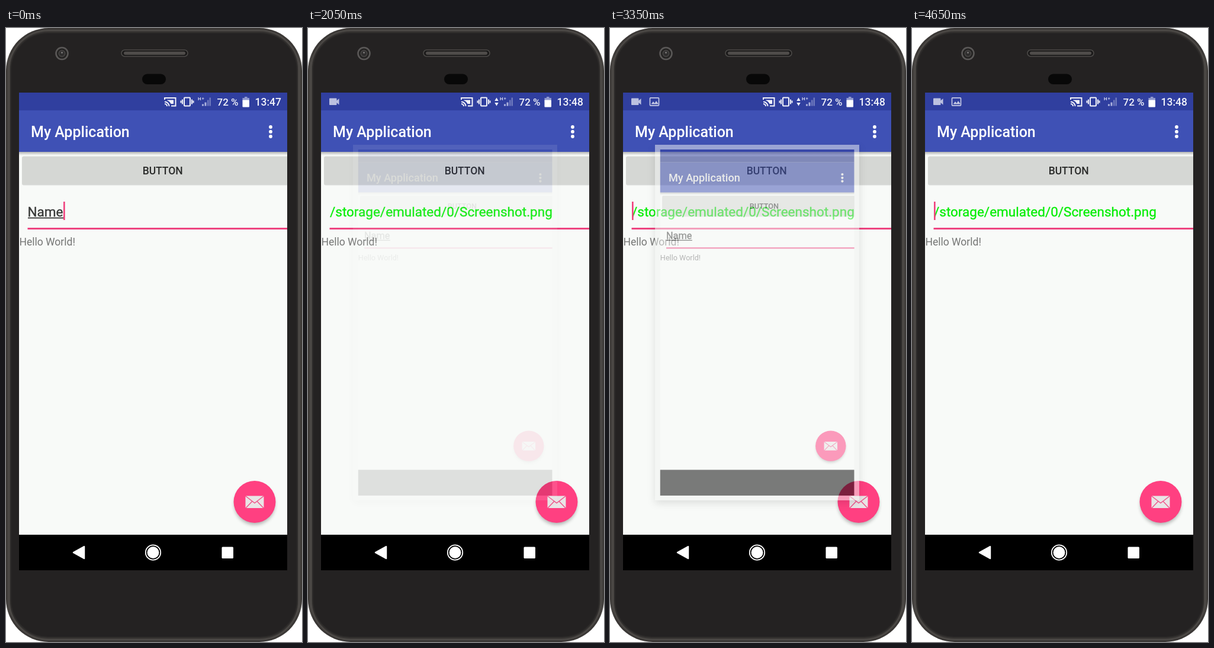
Write an HTML page that moves like this. It is 500 px wide and 1036 px high and loops after 4.7 s.

```html
<!DOCTYPE html>
<html lang="en">
<head>
<meta charset="utf-8">
<title>Screenshot preview</title>
<style>
  html, body { margin: 0; width: 100%; height: 100%; overflow: hidden; background: #fff; }
  svg { display: block; width: 100%; height: 100%; }
  text { font-family: Roboto, sans-serif; white-space: pre; }
  .title { font-size: 25px; font-weight: 500; fill: #fff; }
  .label { font-size: 17.5px; font-weight: 500; fill: #2a2b2a; }
  .hello { font-size: 17.5px; fill: #757675; }
  .field { font-size: 22.5px; fill: #363736; stroke: #363736; stroke-width: .35px; }
  #path { fill: #05ee05; stroke: #05ee05; }
  .status { font-size: 17.5px; font-weight: 500; fill: #f2f3fa; }
  #card { filter: drop-shadow(0 5px 7px rgba(0, 0, 0, .22)); }
</style>
</head>
<body>
<svg viewBox="0 0 500 1036">
  <defs>
    <linearGradient id="rim">
      <stop offset="0" stop-color="#383533"/>
      <stop offset=".008" stop-color="#4a4744"/>
      <stop offset=".018" stop-color="#3b3836"/>
      <stop offset=".982" stop-color="#3b3836"/>
      <stop offset=".992" stop-color="#4a4744"/>
      <stop offset="1" stop-color="#383533"/>
    </linearGradient>
    <linearGradient id="drop" x2="0" y2="1">
      <stop offset="0" stop-color="#000" stop-opacity=".28"/>
      <stop offset="1" stop-color="#000" stop-opacity="0"/>
    </linearGradient>
    <filter id="soft" x="-30%" y="-30%" width="160%" height="160%">
      <feGaussianBlur stdDeviation="3"/>
    </filter>
    <clipPath id="screen"><rect x="22" y="109" width="453" height="806"/></clipPath>
    <clipPath id="press"><rect x="27" y="216.5" width="460" height="48" rx="3"/></clipPath>

    <g id="base">
      <rect x="22" y="109" width="453" height="806" fill="#f8faf8"/>
      <rect x="22" y="109" width="453" height="30" fill="#303f9f"/>
      <rect x="22" y="139" width="453" height="70" fill="#3f51b5"/>
      <rect x="22" y="209" width="453" height="6" fill="url(#drop)"/>
      <rect x="27" y="217.5" width="460" height="48" rx="3" fill="#c3c4c3" opacity=".5"/>
      <rect x="27" y="216.5" width="460" height="48" rx="3" fill="#d5d7d4"/>
      <rect x="22" y="855" width="453" height="60"/>
    </g>
    <g id="labels">
      <text class="title" x="42" y="184">My Application</text>
      <g fill="#fff">
        <circle cx="447" cy="167" r="2.9"/>
        <circle cx="447" cy="175" r="2.9"/>
        <circle cx="447" cy="183" r="2.9"/>
      </g>
      <text class="label" x="264.7" y="247" text-anchor="middle">BUTTON</text>
      <text class="hello" x="22.5" y="367">Hello World!</text>
      <rect x="36.5" y="337" width="439" height="3" fill="#ee4480"/>
      <circle cx="420" cy="804" r="34" opacity=".3" filter="url(#soft)"/>
      <circle cx="420" cy="799.5" r="35.5" fill="#ff4081"/>
      <rect x="404.5" y="789.5" width="31" height="20.5" rx="1.5" fill="#e9e5e6"/>
      <path d="M405 790l15 11.5 15-11.5M405 810l10.5-11M435 810l-10.5-11" fill="none" stroke="#f0568c" stroke-width="1.5"/>
    </g>
    <g id="name">
      <text class="field" x="36.5" y="318">Name</text>
      <path d="M37 320.5h60" stroke="#444544" stroke-width="2"/>
    </g>
  </defs>

  <!-- handset -->
  <rect width="500" height="1036" rx="72" fill="url(#rim)"/>
  <rect x="5" y="4" width="490" height="1028" rx="67" fill="none" stroke="#4d4a47" stroke-width="2"/>
  <rect x="8" y="8" width="484" height="1020" rx="63" fill="#242222" stroke="#2d2b2a" stroke-width="2"/>
  <circle cx="94.5" cy="43" r="10" fill="#242322" stroke="#5a5857" stroke-width="2.6"/>
  <circle cx="94.5" cy="43" r="5.2" fill="#2f2e2e" stroke="#4a4847" stroke-width="1.5"/>
  <circle cx="94.5" cy="41.5" r="1.6" fill="#777574"/>
  <rect x="195" y="37" width="112" height="11" rx="5.5" fill="#1b1a1a" stroke="#4c4a48" stroke-width="1.5"/>
  <rect x="199" y="39.8" width="104" height="5.4" rx="2.7" fill="#4f4c4a"/>
  <rect x="230" y="77.5" width="40" height="17.5" rx="8.7" fill="#080808"/>

  <g clip-path="url(#screen)">
    <use href="#base"/>
    <rect id="lift" x="27" y="218" width="460" height="49" rx="4" opacity="0" filter="url(#soft)"/>
    <g clip-path="url(#press)">
      <rect id="pressed" x="27" y="216" width="460" height="49" fill="#cdcfcd" opacity="0"/>
      <circle id="ripple" cy="244" fill="#c3c5c3" opacity="0"/>
    </g>
    <use href="#labels"/>
    <use href="#name" id="hint"/>
    <text id="path" class="field" x="37" y="318">/storage/emulated/0/Screenshot.png</text>
    <rect id="caret" y="293" width="2.6" height="31" fill="#f0407d"/>

    <!-- status bar -->
    <path id="video" fill="#fff" d="M37 118.5h10.5q1 0 1 1v3l4-3.5v10.5l-4-3.5v3q0 1-1 1H37q-1 0-1-1v-9.5q0-1 1-1z"/>
    <g id="photo" opacity=".72">
      <rect x="67.5" y="117.8" width="15" height="13" rx="1" fill="none" stroke="#fff" stroke-width="1.7"/>
      <path d="M69.5 128.5l3.5-4.5 2.500 3 2.500-4 4 5.5z" fill="#fff"/>
    </g>
    <g id="modes" fill="none" stroke="#f2f3fa" stroke-width="2">
      <path d="M268 121v-3h18.5v13.5H279M268 124.5a7.5 7.5 0 0 1 7.5 7.5M268 128a4 4 0 0 1 4 4"/>
      <path d="M272 121.500h11v6.500h-4.500q-2-4.500-6.500-6z" fill="#f2f3fa" stroke="none"/>
      <rect x="301" y="117.5" width="10" height="14" rx="1"/>
      <path d="M298 120.5v8M295.5 122.5v4M314 120.5v8M316.5 122.5v4"/>
    </g>
    <path id="data" fill="#f2f3fa" d="M318.5 117.5l3.2 5.5h-6.4zM318.5 131.5l3.2-5.5h-6.4z"/>
    <text x="324" y="121.5" font-size="8" font-weight="700" fill="#d5d8ee">H</text>
    <path d="M331 119h3.5M332.7 117.3v3.5" stroke="#c3c8e6"/>
    <path d="M331 131.5v-3h3v3zM335.5 131.5v-6h3v6z" fill="#a9b0dc"/>
    <path d="M340 131.5v-10h2.5v10zM343.5 131.5v-14h2.5v14z" fill="#6e79bd"/>
    <text class="status" x="356.5" y="131" style="font-size:17px">72 %</text>
    <path d="M399.5 118h3.5v-2h4.5v2h3.5v5h-11.5z" fill="#8f98cf"/>
    <rect x="399.5" y="121.5" width="11.5" height="12" rx="1" fill="#fff"/>
    <text id="clock" class="status" x="420.5" y="131"></text>

    <!-- navigation -->
    <g fill="#fff">
      <path d="M114 885l18-10v20z" stroke="#fff" stroke-width="2.5" stroke-linejoin="round"/>
      <circle cx="248.5" cy="885" r="10"/>
      <circle cx="248.5" cy="885" r="12.7" fill="none" stroke="#fff" stroke-width="1.8"/>
      <rect x="364.5" y="875.5" width="19.5" height="19.5" rx="1.5"/>
    </g>

    <!-- floating preview -->
    <g id="card">
      <rect x="76" y="197" width="345" height="600" fill="#f2f4f2"/>
      <g transform="translate(84.5 205) scale(.7245) translate(-22 -109)" clip-path="url(#screen)">
        <use href="#base"/>
        <use href="#labels"/>
        <use href="#name"/>
      </g>
    </g>
  </g>
</svg>
<script>
const LOOP = 4700;
const SET_TEXT = 1900;
const caretOn = [[0, 550], [1100, 1600], [2100, 2700], [3100, 3700], [4100, LOOP]];
const videoBright = [[400, 750], [900, 1350], [1500, 2050], [2450, 2700], [2900, 3300], [3850, 4300]];

const el = id => document.getElementById(id);
const set = (id, attrs) => {
  for (const key in attrs) el(id).setAttribute(key, attrs[key]);
};
const show = (id, on) => { el(id).style.display = on ? '' : 'none'; };
const within = (spans, t) => spans.some(([a, b]) => t >= a && t < b);
const ramp = (t, a, b) => Math.min(1, Math.max(0, (t - a) / (b - a)));

// Quadratic ease-out on entry, ease-in on exit
function cardAlpha(t) {
  if (t > 3100 && t < 3300) t = 3100;
  const enter = 1 - (1 - ramp(t, 2025, 2525)) ** 2;
  return enter * (1 - ramp(t, 3000, 3500) ** 2);
}

function render(now) {
  const t = Math.floor(now % LOOP / 50) * 50;

  const press = ramp(t, 1350, 1500) * (1 - ramp(t, 1700, 1900));
  const spread = ramp(t, 1500, 1850);
  set('pressed', { opacity: press });
  set('lift', { opacity: press * .2 });
  set('ripple', {
    cx: 393 - 110 * ramp(t, 1600, 1850),
    r: 12 + 270 * spread ** 2,
    opacity: ramp(t, 1450, 1550) * (1 - ramp(t, 1650, 1850))
  });

  const done = t >= SET_TEXT;
  show('hint', !done);
  show('path', done);
  show('caret', within(caretOn, t));
  set('caret', { x: done ? 37 : 97 });

  const busy = t >= SET_TEXT && t < 3700;
  show('data', busy);
  set('modes', { transform: `translate(${busy ? -9 : 0})` });
  show('photo', t >= 2450);
  set('video', { opacity: ramp(t, 0, 400) * (within(videoBright, t) ? 1 : .68) });
  el('clock').textContent = t < 1350 ? '13:47' : '13:48';

  const alpha = cardAlpha(t);
  show('card', alpha > 0);
  set('card', { opacity: alpha });
}

const start = performance.now();
function tick() {
  render(performance.now() - start);
  requestAnimationFrame(tick);
}
tick();
</script>
</body>
</html>
```
